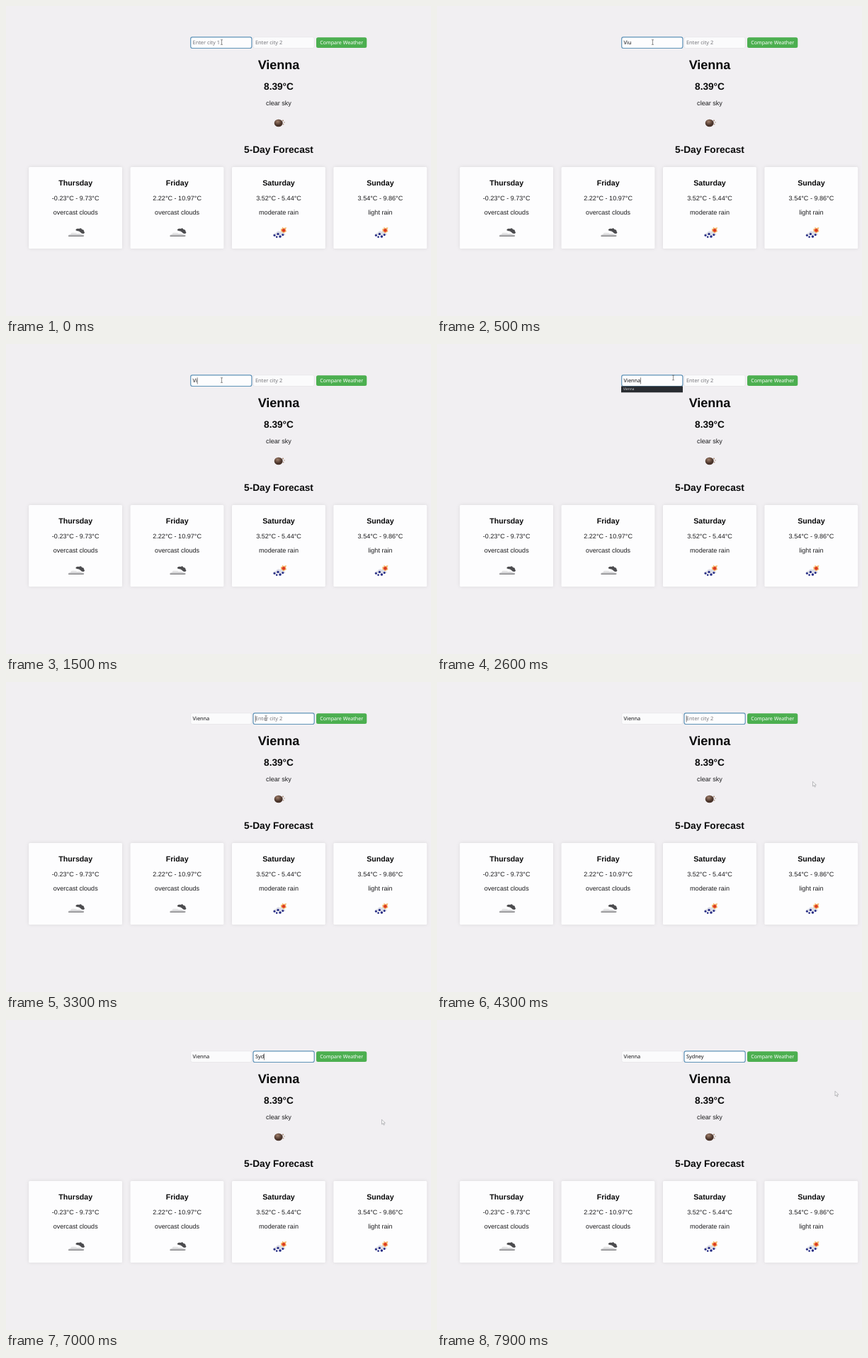
Write an HTML page that moves like this. It is 600x437 px and loops after 8000 ms.

```html
<!DOCTYPE html>
<html lang="en">
<head>
<meta charset="utf-8">
<style>
html, body { margin: 0; width: 100%; height: 100%; overflow: hidden; background: #f1eff2; }
svg { display: block; width: 600px; height: 437px; }
text { font-family: "Liberation Sans", Arial, sans-serif; font-size: 9.07px; fill: #1c1c1e; text-anchor: middle; white-space: pre; text-rendering: geometricPrecision; }
.bold { font-weight: bold; fill: #0a0a0b; }
.ui { font-family: "Noto Sans", sans-serif; font-size: 7.35px; text-anchor: start; }
.card { fill: #fdfdfe; filter: drop-shadow(0 0 2.5px rgba(0,0,0,.09)); }
.icon { filter: blur(.4px); }
</style>
</head>
<body>
<svg viewBox="0 0 600 437">
  <defs>
    <radialGradient id="moon" cx=".4" cy=".3">
      <stop offset="0" stop-color="#a07f6b"/><stop offset="1" stop-color="#49332a"/>
    </radialGradient>
    <linearGradient id="cloud" x2="0" y2="1">
      <stop offset="0" stop-color="#fafafa"/><stop offset=".6" stop-color="#d2d2d4"/><stop offset="1" stop-color="#77777a"/>
    </linearGradient>
    <g id="clouds">
      <path d="M-11 5Q-12 2-8 2Q-7-2-3-1Q0-1 1 1Q5 0 7 2Q11 2 11 4Q11 5 9 5Z" fill="url(#cloud)"/>
      <path d="M-1-4Q0-7 4-6Q7-8 8-5Q11-5 11-2Q13 0 10 1Q7 1 6-1Q4-3 1-3Z" fill="#4c4c4f"/>
    </g>
    <g id="rain">
      <path d="M2-6L4-6L4-8.5L6-7L10-8L9-5L10-2L8-1L6 0L4 0L2-2Z" fill="#f5b56a"/>
      <circle cx="6" cy="-3.8" r="2.3" fill="#dc3a23"/>
      <path d="M-9 3Q-9 0-5 0Q-3-4 1-2Q4-3 5 0Q9 0 8 3Z" fill="#dcdde5"/>
      <g fill="#272d85">
        <circle cx="-7" cy="3.2" r="1.5"/><circle cx="-2" cy="1.4" r="1.6"/>
        <circle cx="1" cy="5" r="1.8"/><circle cx="4.8" cy="2.6" r="1.5"/><circle cx="-3.8" cy="5.6" r="1.3"/>
      </g>
    </g>
  </defs>

  <g id="cards"></g>

  <text class="bold" x="385" y="88.7" style="font-size:18px">Vienna</text>
  <text class="bold" x="385" y="117.8" style="font-size:13.65px">8.39°C</text>
  <text x="385" y="140.3">clear sky</text>
  <g class="icon">
    <ellipse cx="384.7" cy="165" rx="6" ry="5.2" fill="url(#moon)"/>
    <g fill="#a58570"><circle cx="391" cy="161.5" r="1"/><circle cx="393" cy="164" r=".7"/><circle cx="391.6" cy="166.8" r=".8"/></g>
  </g>
  <text class="bold" x="385" y="206.6" style="font-size:13.65px">5-Day Forecast</text>

  <g id="fields"></g>
  <rect x="438" y="44.2" width="71.3" height="14.9" rx="2.5" fill="#4caf50"/>
  <text class="ui" x="473.7" y="54.3" style="font-size:7.15px;text-anchor:middle;fill:#fff">Compare Weather</text>

  <g id="suggestion">
    <rect x="260" y="59.5" width="87" height="8.8" fill="#292c31"/>
    <text class="ui" x="263" y="65.4" style="font-size:4.8px;fill:#d8d8da">Vienna</text>
  </g>
  <path id="caret" stroke="#333" stroke-width=".6" d="M0 47.3V56.5"/>
  <path id="beam" fill="none" stroke="#666" stroke-width=".7" d="M-1.6-3.3H1.6M0-3.3V3.3M-1.6 3.3H1.6"/>
  <path id="arrow" fill="#fafafa" stroke="#a0a0a4" stroke-width=".7" d="M0 0V6.7L1.6 5.3L2.7 7.8L3.9 7.3L2.8 4.9H4.9Z"/>
</svg>
<script>
const $ = id => document.getElementById(id);
const days = [
  ["Thursday", "-0.23°C - 9.73°C", "overcast clouds", "clouds"],
  ["Friday", "2.22°C - 10.97°C", "overcast clouds", "clouds"],
  ["Saturday", "3.52°C - 5.44°C", "moderate rain", "rain"],
  ["Sunday", "3.54°C - 9.86°C", "light rain", "rain"]
];
$("cards").innerHTML = days.map(([day, range, sky, icon], i) => `
  <g transform="translate(${98.2 + i * 143.4} 0)">
    <rect class="card" x="-66" y="227" width="131.8" height="115" rx="1.5"/>
    <text class="bold" y="252.7" style="font-size:10.65px">${day}</text>
    <text y="274.4">${range}</text>
    <text y="294.4">${sky}</text>
    <use class="icon" href="#${icon}" transform="translate(1 320)"/>
  </g>`).join("");

const fieldX = [260.7, 349];
$("fields").innerHTML = fieldX.map(x => `
  <rect x="${x}" y="43.8" width="86.2" height="15.7" rx="2.5"/>
  <text class="ui" x="${x + 2.9}" y="54.4"></text>`).join("");
const boxes = $("fields").querySelectorAll("rect");
const labels = $("fields").querySelectorAll("text");

const LOOP = 8000, FOCUS_SECOND = 3200;
// [time, value]: each value holds until the next entry
const typed = [
  [[0, ""], [100, "V"], [300, "Vi"], [400, "Viu"], [1400, "Vi"], [1800, "Vie"], [2000, "Vien"], [2100, "Vienn"], [2300, "Vienna"]],
  [[0, ""], [6200, "S"], [6900, "Sy"], [7000, "Syd"], [7200, "Sydn"], [7300, "Sydne"], [7400, "Sydney"]]
];
const suggesting = [[0, 0], [100, 1], [400, 0], [1600, 1], [3000, 0]];
const blinking = [[0, 0], [100, 1], [500, 0], [1000, 1], [3000, 0], [3200, 1], [4600, 0], [5100, 1],
  [5600, 0], [6200, 1], [6700, 0], [6900, 1], [7900, 0]];
const mouse = [[0, 304.5, 51], [2500, 304.5, 51], [2600, 333.5, 47.5], [2900, 367, 51], [3400, 367, 51],
  [3700, 478, 95], [3900, 538, 139], [4000, 530.5, 140.3], [7700, 530.5, 140.3], [7900, 562, 100.3], [8000, 562, 100.3]];

const held = (steps, t) => steps.findLast(s => s[0] <= t)[1];

function mouseAt(t) {
  const i = mouse.findIndex(p => p[0] > t);
  const [t0, x0, y0] = mouse[i - 1], [t1, x1, y1] = mouse[i];
  const k = (t - t0) / (t1 - t0);
  return [x0 + (x1 - x0) * k, y0 + (y1 - y0) * k];
}

function draw(t) {
  const active = t < FOCUS_SECOND ? 0 : 1;
  labels.forEach((label, i) => {
    const value = held(typed[i], t);
    label.textContent = value || "Enter city " + (i + 1);
    label.style.fill = value ? "#111113" : "#77777c";
    boxes[i].style.cssText = i === active
      ? "fill:#fdfdfe;stroke:#5f93b8;stroke-width:1.2"
      : "fill:#fbfbfc;stroke:#e4e3e6;stroke-width:.7";
    if (i === active) {
      const width = value ? label.getComputedTextLength() : 0;
      $("caret").setAttribute("transform", `translate(${fieldX[i] + 3.2 + width} 0)`);
    }
  });
  $("caret").style.opacity = held(blinking, t);
  $("suggestion").style.opacity = held(suggesting, t);

  const [x, y] = mouseAt(t);
  const overField = x < 435 && y < 60;
  for (const id of ["beam", "arrow"]) {
    $(id).setAttribute("transform", `translate(${x} ${y})`);
    $(id).style.opacity = +((id === "beam") === overField);
  }
}

function tick() {
  draw(Math.floor(performance.now() % LOOP / 100) * 100);
  requestAnimationFrame(tick);
}
tick();
</script>
</body>
</html>
```
